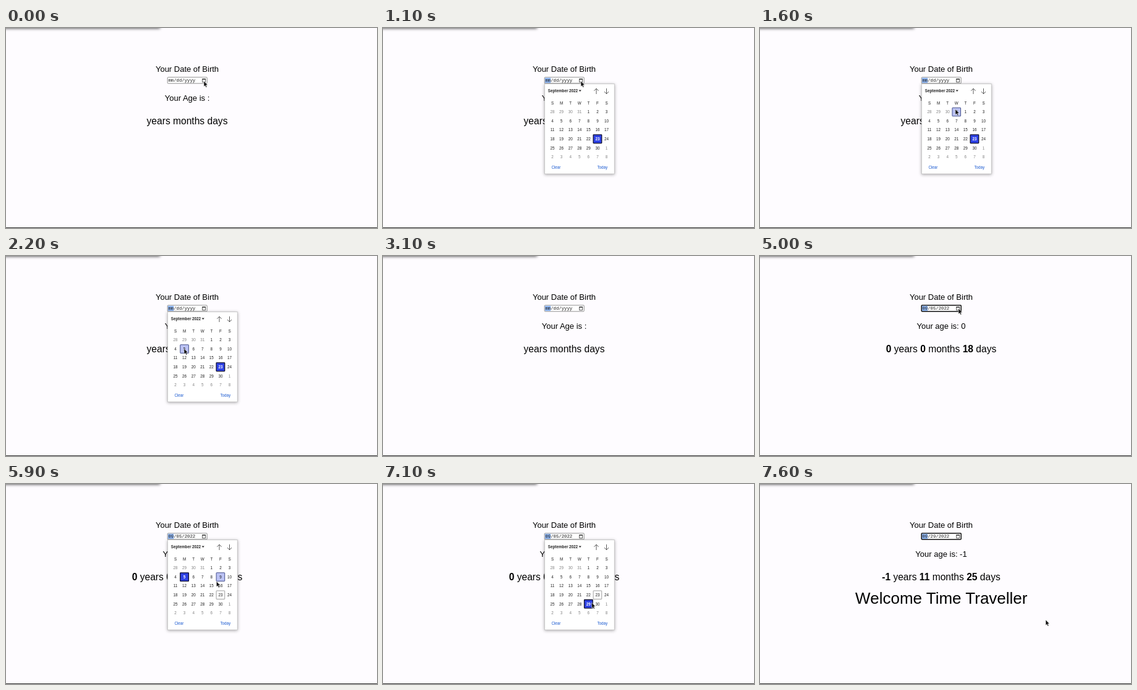
These frames come from a looping animation (600 px wide and 324 px high, 8 s). An HTML page:

```html
<!DOCTYPE html>
<html lang="en">
<head>
<meta charset="utf-8">
<title>Age calculator</title>
<style>
  html, body { margin: 0; width: 600px; height: 324px; overflow: hidden; background: #fefcff; }
  svg { display: block; font: 13px "Liberation Sans", Arial, sans-serif; }
  .mid { text-anchor: middle; }
  .big { font-size: 15.6px; }
  .huge { font-size: 26px; }
  .mono { font: 7.3px "Liberation Mono", "DejaVu Sans Mono", monospace; fill: #222; }
  .small { font-size: 6.3px; fill: #222; }
  .small .out { fill: #858585; }
  .small .link { fill: #1a5ad0; }
  .bold { font-weight: bold; }
  #popup { filter: drop-shadow(0 1px 2.5px rgba(0, 0, 0, .35)); }
  .line { fill: none; stroke: #333; stroke-width: .8; }
</style>
</head>
<body>
<svg width="600" height="324" viewBox="0 0 600 324">
  <rect x="-10" y="-12" width="259" height="11.5" style="filter:drop-shadow(0 1px 2.5px rgba(0,0,0,.75))"/>
  <rect y="323" width="600" height="1" fill="#333"/>

  <text class="mid" x="293" y="71">Your Date of Birth</text>
  <text class="mid" x="293" y="118" id="age"></text>
  <text class="mid big" x="293" y="156" id="span"></text>
  <text class="mid huge" x="293.3" y="193.5" id="welcome">Welcome Time Traveller</text>

  <rect id="box" x="261.2" y="79.8" width="64" height="10" rx="1" fill="#fff"/>
  <rect id="mark" x="262" y="80.7" width="9.2" height="8.2" fill="#8db5f2"/>
  <text class="mono" x="262.4" y="87.2" id="date"></text>
  <path class="line" d="M317.6 82.8h5v4.9h-5z"/>
  <path class="line" d="M317.4 82.7h5.4" style="stroke-width:1.4"/>

  <g id="popup" class="small">
    <rect x="261.4" y="90.6" width="112.8" height="145.6" fill="#fff" stroke="#bbb" stroke-width=".7"/>
    <text class="bold" x="266.8" y="104.3">September 2022</text>
    <path d="M316.6 100.6h4.2l-2.1 2.5z" fill="#222"/>
    <path class="line" d="M345 107v-9M341.4 101.8l3.6-3.7 3.6 3.7M361.5 97.8v9M357.9 103l3.6 3.7 3.6-3.7"/>
    <g id="days"></g>
    <text class="link" x="272.4" y="227.8">Clear</text>
    <text class="link" x="346.4" y="227.8">Today</text>
  </g>

  <path id="arrow" d="M0 0V9L2 7.2 3.4 10.3 4.9 9.6 3.5 6.6H6.2Z" fill="#111" stroke="#fff" stroke-width=".5"/>
  <path id="beam" class="line" d="M286.8 147h3M288.3 147v8M286.8 155h3" style="stroke:#999;stroke-width:.6"/>
</svg>

<script>
const $ = id => document.getElementById(id);
const show = (id, on) => $(id).style.display = on ? '' : 'none';

const LOOP = 8000, PITCH = 14.58, LEFT = 274, TOP = 136, TODAY = 26;

// Pointer tip: time, x, y
const path = [
  [0, 320, 86], [1300, 320, 86], [1600, 316, 131.5], [1900, 302, 161],
  [2200, 288, 150], [2300, 288, 149], [3100, 288, 149], [3500, 482, 201],
  [4200, 482, 201], [4700, 321, 86], [4900, 321, 85], [5500, 321, 85],
  [5900, 340.3, 157.6], [6300, 333.5, 189], [6800, 333.5, 189],
  [6900, 331.5, 190], [7000, 331.5, 190], [7100, 337.5, 192],
  [7600, 462, 220], [LOOP, 462, 220]
];

function pointer(t) {
  const i = path.findIndex(p => p[0] > t);
  const [t0, x0, y0] = path[i - 1], [t1, x1, y1] = path[i];
  const k = (t - t0) / (t1 - t0);
  return [x0 + (x1 - x0) * k, y0 + (y1 - y0) * k];
}

function hoveredDay(x, y) {
  const col = Math.round((x - LEFT) / PITCH), row = Math.round((y - TOP) / PITCH);
  return col >= 0 && col < 7 && row >= 0 && row < 6 ? row * 7 + col : -1;
}

function label(x, y, text, attrs = '') {
  return `<text class="mid" x="${x}" y="${y + 2.3}" ${attrs}>${text}</text>`;
}

function cell(x, y, fill, stroke, width) {
  return `<rect x="${x - 6.8}" y="${y - 6.8}" width="13.6" height="13.6" rx=".5"
    fill="${fill}" stroke="${stroke}" stroke-width="${width}"/>`;
}

function calendar(selected, hover) {
  let out = [...'SMTWTFS'].map((d, i) => label(LEFT + i * PITCH, 121.3, d)).join('');
  for (let i = 0; i < 42; i++) {
    const x = LEFT + i % 7 * PITCH, y = TOP + (i / 7 | 0) * PITCH;
    const day = i < 4 ? i + 28 : i < 34 ? i - 3 : i - 33;
    let attrs = '';
    if (i === selected) {
      out += cell(x, y, '#2f43e6', '#101030', 1.3);
      attrs = 'style="fill:#fff;font-weight:bold"';
    } else if (i === hover) {
      out += cell(x, y, '#bcc3f5', '#34407f', .9);
    } else if (i === TODAY) {
      out += cell(x, y, 'none', '#777', .7);
    }
    if (!attrs && (i < 4 || i > 33)) attrs = 'fill="#858585"';
    out += label(x, y, day, attrs);
  }
  return out;
}

const bold = n => `<tspan class="bold">${n}</tspan>`;
const ageSpan = (y, m, d) => `${bold(y)} years ${bold(m)} months ${bold(d)} days`;
const states = [
  ['mm/dd/yyyy', 'Your Age is :', 'years months days'],
  ['09/05/2022', 'Your age is: 0', ageSpan(0, 0, 18)],
  ['09/29/2022', 'Your age is: -1', ageSpan(-1, 11, 25)]
];

let last = -1;
function draw(now) {
  const t = Math.floor(now % LOOP / 100) * 100;
  if (t !== last) {
    last = t;
    const state = t < 3200 ? 0 : t < 7300 ? 1 : 2;
    const open = t >= 1000 && t < 3100 || t >= 5500 && t < 7200;
    const ring = !open && state > 0;
    const [x, y] = pointer(t);

    [$('date').textContent, $('age').textContent, $('span').innerHTML] = states[state];
    show('welcome', state === 2);
    show('mark', t >= 1000);
    $('box').setAttribute('stroke', ring ? '#111' : '#777');
    $('box').setAttribute('stroke-width', ring ? 1.5 : .8);

    show('popup', open);
    if (open) {
      const selected = t < 3100 ? TODAY : t < 7100 ? 8 : 32;
      $('days').innerHTML = calendar(selected, hoveredDay(x, y));
    }
    show('beam', t === 3100);
    show('arrow', t !== 3100);
    $('arrow').setAttribute('transform', `translate(${x} ${y})`);
  }
  requestAnimationFrame(draw);
}
const start = performance.now();
requestAnimationFrame(function tick() { draw(performance.now() - start); });
</script>
</body>
</html>
```
